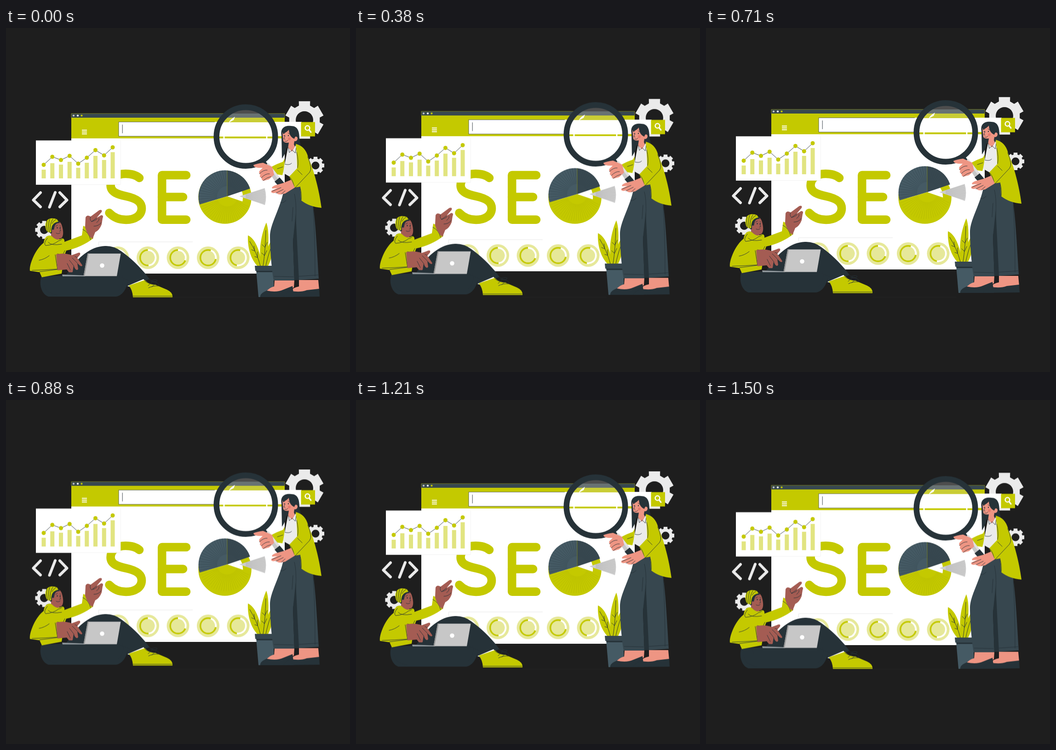
An HTML page that plays this animation: 748 px wide and 748 px high, repeating every 1540 ms.

```html
<!DOCTYPE html>
<html lang="en">
<head>
<meta charset="utf-8">
<title>SEO</title>
<style>
html, body { margin: 0; width: 100%; height: 100%; overflow: hidden; background: #1e1e1e; }
svg { display: block; width: 100vw; height: 100vh; }
.y { fill: #c4c900 }
.d { fill: #263238 }
.g { fill: #37474f }
.b { fill: #455a64 }
.w { fill: #fff }
.l { fill: #ebebeb }
.m { fill: #a45c53 }
.p { fill: #ee9583 }
.ln { fill: none; stroke: #263238; stroke-width: .9; stroke-linecap: round; stroke-linejoin: round }
.seo { fill: none; stroke: #c4c900; stroke-width: 18.5; stroke-linecap: round; stroke-linejoin: round }
.code { fill: none; stroke: #ebebeb; stroke-width: 6; stroke-linecap: round; stroke-linejoin: round }
</style>
</head>
<body>
<svg viewBox="0 0 748 748">
  <defs>
    <clipPath id="disc"><circle cx="476" cy="367" r="57.5"/></clipPath>
    <clipPath id="lens"><circle cx="521.5" cy="236" r="59"/></clipPath>
  </defs>

  <g class="float">
    <g id="gears" class="l" fill-rule="evenodd"></g>
    <path class="w" d="M142 186H606V534H142Z"/>
    <path class="y" d="M142 195H606V240H142Z"/>
    <path class="g" d="M142 186H606V195H142Z"/>
    <path d="M142 195V186H606V195" fill="none" stroke="#8f9420" stroke-width=".8"/>
    <circle cx="147" cy="190.5" r="2.1" fill="#c7c7c7"/>
    <circle class="w" cx="156" cy="190.5" r="2.1"/>
    <circle class="y" cx="164.5" cy="190.5" r="2.1"/>
    <path d="M165 222.300H176M165 226.300H176M165 230.300H176" stroke="#fff" stroke-width="1.900"/>
    <path class="w" d="M245 204H643V235.300H245Z"/>
    <path d="M454 235.300H245V204.300H454" fill="none" stroke="#263238" stroke-width=".7"/>
    <path class="ln" d="M253.200 210.500V228.500"/>
    <path class="y" d="M641.500 204.500H672V235.700H641.500Z"/>
    <circle cx="655.500" cy="217.500" r="4.900" fill="none" stroke="#fff" stroke-width="2.500"/>
    <path d="M659 221.500L663 226.500" stroke="#fff" stroke-width="3" stroke-linecap="round"/>
    <path d="M201.500 474V465H406" fill="none" stroke="#e2e2e2" stroke-width=".8"/>
    <g id="dials" fill="none"></g>
  </g>

  <path d="M362 585.500H545" stroke="#232323"/>
  <path class="seo" d="M290 326C283 320 273 317 260 317C240 317 227.500 328 227.500 342C227.500 357 243 362 262 366C285 371 295 379 295 392C295 408 280 417 261 417C245 417 233 411 224.500 402"/>
  <path class="seo" d="M392 320H339.200V416.700H392M339 367.500H385"/>
  <circle class="seo" cx="476" cy="368" r="48.500"/>

  <g class="float">
    <g clip-path="url(#disc)">
      <path class="b" d="M481 366V300H410V387Z"/>
      <path class="g" d="M481 366V300H540V346Z"/>
      <path class="y" d="M481 366L410 387V430H540V386Z"/>
      <path id="rays" fill="none" stroke-width=".6"/>
      <path id="sunrays" fill="none" stroke-width=".6"/>
      <path d="M481 366V300" stroke="#7d841c" stroke-width=".8"/>
    </g>
    <path d="M507.500 366L562.500 348Q568 366 563 385Z" fill="#cdcdcd"/>
    <path id="fan" fill="none" stroke-width=".6"/>

    <path class="w" d="M65 244.500H249V340.500H65Z"/>
    <path d="M249 244.500V340.500H65" fill="none" stroke="#efefef" stroke-width=".8"/>
    <g id="chart"></g>
    <path class="code" d="M75 358L59.500 374L75 389M107 357.500L94.500 389.500M117 358L132.500 374L117 389"/>

    <!-- plant -->
    <path class="y" d="M526 451C541 457 553 484 556 517H546C531 500 525 476 526 451Z"/>
    <path class="y" d="M566 423C574 444 571 489 563 517H556C548 488 554 451 566 423Z"/>
    <path class="y" d="M579 459C582 483 578 502 570 517H562C562 493 568 475 579 459Z"/>
    <path class="ln" d="M530 464Q546 490 553 517M565 440Q564 485 559 517M577 475Q568 500 565 517M534 482L541 485L539 474M541 497L547 499L547 487M557 471L563 477L568 466M556 489L562 495L567 484"/>
    <path class="b" d="M544 527H582V585H549Z"/>
    <path class="g" d="M541 517H582V528H542Z"/>
    <path class="d" d="M544 528H582V531H545Z"/>

    <!-- man -->
    <path class="m" d="M97 426C103 414 119 417 122 431C126 445 125 458 116 458L116 464L98 461L98 446Z"/>
    <path class="d" d="M96 446C91 437 97 420 107 418Q115 416 117 424Q109 423 106 430L104 439Q98 436 100 446Z"/>
    <path class="y" d="M86 434C83 416 97 410 111 416L114 421Q101 423 99 435L98 444Q88 447 86 434Z"/>
    <path class="ln" d="M89 420Q87 432 91 444M95 416Q90 430 95 445M102 415Q94 427 97 440M109 416Q102 420 100 425" stroke="#8b9000"/>
    <path class="ln" d="M108 431L112 429M117 430L119 431M117 435L119 441L116 442M109 446Q114 449 118 445"/>
    <circle class="d" cx="111.500" cy="434.500" r="1.300"/>
    <circle class="d" cx="118" cy="434.500" r="1.200"/>
    <path class="d" d="M77 540C71 556 77 579 92 584H239C252 583 262 568 265 552L263 563L312 546C298 526 272 500 250 485Q234 473 215 474C183 475 160 499 146 515L132 538Z"/>
    <path class="ln" d="M88 541Q102 539 104 551M82 556Q86 578 111 580M254 539Q259 558 244 572M247 541Q274 551 282 558" stroke="#455a64"/>
    <path class="y" d="M82 467C83 454 93 448 100 453Q111 465 122 457Q128 458 127 465L165 451L168 430Q185 437 190 457C174 470 151 480 131 484L127 495L121 534L78 542L73 531L52 528C50 516 63 481 82 467Z"/>
    <path class="ln" d="M90 457Q81 468 86 473Q103 472 114 463Q122 461 123 457M94 495Q84 503 72 505M128 484L123 494L112 491M107 493L112 525L73 530M167 438Q180 444 184 460M92 466Q98 474 121 470"/>
    <path d="M57 527Q85 526 113 524" class="ln"/>
    <path class="m" d="M109 492Q128 488 143 494L154 490Q163 486 161 493L155 500L166 516Q165 520 160 516L155 511L157 524Q154 529 150 523L147 517L145 530Q141 537 136 530L132 525L112 527Z"/>
    <path class="ln" d="M144 500L155 511M138 505L148 518M133 512L140 526M150 497L155 499" stroke="#5d332d"/>
    <path class="m" d="M172 433L173 412Q176 405 184 410L203 396Q210 394 208 400L197 413L207 407Q213 407 210 414L208 427Q203 440 194 444L188 459Q176 449 172 433Z"/>
    <path class="ln" d="M184 411Q181 416 186 421L197 413M186 421Q194 419 198 415M197 423Q204 418 202 414M191 431Q202 431 207 423" stroke="#4d2b28"/>
    <path d="M122 536L172 538V540H123Z" fill="#8d959a"/>
    <path class="d" d="M135 531L171 532L170 537L131 536Z"/>
    <path d="M177.500 490.500H249.500L241 539.500H168.500Z" fill="#c7c7c7"/>
    <path d="M177.500 490.500L168.500 539.500H171L180 490.500Z" fill="#999"/>
    <circle class="w" cx="209" cy="516.500" r="4.800"/>
    <path class="w" d="M264 561L299 546L304 552L276 565Z"/>
    <path class="y" d="M267 560L302 548Q310 557 324 558L350 569Q363 575 362 585.500H276Q275 569 267 560Z"/>
    <path class="ln" d="M275 583H361M302 550Q310 557 324 558M309 560L319 551M317 563L327 554M303 548Q306 539 315 549Q326 546 329 549Q326 555 314 551M317 550Q333 553 333 560M310 565Q320 560 331 561"/>

    <!-- woman -->
    <path class="d" d="M599 233C596 218 606 211 620 213C635 213 638 226 638 240L641 259L629 258L610 260Q608 273 600 284Z"/>
    <path class="p" d="M601 228Q607 222 614 221Q623 223 627 237Q634 234 634 241Q633 247 627 246L626 253L630 262L622 270L613 262L615 249Q607 251 603 246Z"/>
    <path class="d" d="M602 226Q609 212 623 217Q635 222 634 238Q629 233 627 241Q616 237 615 221Q612 226 602 230Z"/>
    <path class="ln" d="M602 230L606 229M613 228L617 231M607 234L604 241L607 242M606 246Q610 248 613 244"/>
    <circle class="d" cx="605" cy="234" r="1.100"/>
    <circle class="d" cx="614" cy="234" r="1.200"/>
    <circle cx="616" cy="241" r="3" fill="#e87a6d"/>
    <path class="g" d="M607 340L640 336L667 382C673 420 676 480 680 545L636 548L630 425L624 462L627 549H582C577 521 574 478 574 452C574 428 594 396 602 362Z"/>
    <path class="ln" d="M627 361Q633 382 629 431M609 375Q600 383 597 379M668 390Q672 455 672 540M583 540L625 541M636 540L679 537M624 390L622 420"/>
    <path class="d" d="M630 405L637 548H627L624 462Z"/>
    <path class="l" d="M613 260L622 269L630 255L645 264L644 306L622 326L602 315L607 291Z"/>
    <path class="ln" d="M614 260L616 271L622 265L629 272L631 260M606 296Q617 299 621 294"/>
    <path class="y" d="M575 303Q592 294 602 291L606 284Q606 301 601 320L581 317Z"/>
    <path class="y" d="M630 252C643 255 653 264 657 281C670 311 681 352 686 391Q660 389 642 375L640 345L627 347L616 323L633 305Q633 282 630 252Z"/>
    <path class="ln" d="M656 280Q667 306 660 314L628 348M617 324Q625 333 627 347M634 309L644 319M640 349Q643 360 642 374M632 270Q637 290 634 304M602 302L590 306"/>

    <!-- lens -->
    <g clip-path="url(#lens)">
      <path d="M460 176H584V186H460Z" fill="#4d4d4d"/>
      <path d="M460 186H584V195H460Z" fill="#687273"/>
      <path d="M460 195H584V205H460Z" fill="#c9cd35"/>
      <path d="M460 205H584V236H460ZM460 240H584V296H460Z" class="w"/>
      <path d="M474 235V241M567 235V241" stroke="#fff" stroke-width="3"/>
    </g>
    <path class="w" d="M484 206Q488 198 498 193L495 200Z"/>
    <circle cx="521.500" cy="236" r="63.800" fill="none" stroke="#263238" stroke-width="12.500"/>
    <path class="d" d="M556 293L563 288L570 297L563 302Z"/>
    <path d="M563 299L571 294L595 325L585 334Z" fill="#c7c7c7"/>
    <path d="M567 296L571 294L595 325L591 328Z" fill="#e0e0e0"/>
    <path class="d" d="M584 334L595 325L607 339L598 350Z"/>
    <path class="p" d="M579 302L559 293Q545 295 538 298Q538 303 549 304L558 304L551 311Q549 316 553 319Q550 324 556 326Q555 332 561 332L572 329L583 319Z"/>
    <path class="ln" d="M551 317Q560 308 568 309M555 326Q564 316 573 317M559 332Q567 325 576 323" stroke="#9c5148"/>
    <path class="p" d="M620 330L603 337L585 342Q576 346 579 349L590 348L577 354Q575 358 581 359L588 358Q589 362 597 362L607 360L628 347Z"/>
    <path class="ln" d="M579 355L598 347M587 359L603 351M599 361L607 354" stroke="#9c5148"/>

    <path class="p" d="M584 549H627L626 564L604 573L565 574Q573 564 583 562ZM637 548H679L681 570L653 574L614 574Q625 564 637 562Z"/>
    <path class="d" d="M553 585Q552 577 567 571Q588 576 603 569L623 561L626 585Z"/>
    <path class="d" d="M604 585Q604 577 617 571Q638 576 654 570L681 567L682 584Z"/>
    <path class="ln" d="M604 584Q605 577 618 573M553 583H603" stroke="#455a64"/>
  </g>
</svg>
<script>
const $ = id => document.getElementById(id);
const polar = (x, y, r, a) => [x + r * Math.cos(a), y + r * Math.sin(a)].map(v => v.toFixed(2)).join(' ');
const rad = deg => deg * Math.PI / 180;

function gear(x, y, r, teeth, hole) {
  const step = 2 * Math.PI / teeth, root = r * .79, pts = [];
  for (let i = 0; i < teeth; i++) {
    const a = i * step - Math.PI / 2;
    pts.push(polar(x, y, root, a - step * .35), polar(x, y, r, a - step * .28),
             polar(x, y, r, a + step * .28), polar(x, y, root, a + step * .35));
  }
  return `<path d="M${pts.join('L')}ZM${x - hole} ${y}a${hole} ${hole} 0 1 0 ${2 * hole} 0a${hole} ${hole} 0 1 0 ${-2 * hole} 0Z"/>`;
}
$('gears').innerHTML = gear(649, 200, 42.5, 6, 19) + gear(673, 299, 19.5, 8, 8.5) + gear(83, 439, 20, 8, 9);

const whiteArcs = [[-90, 90], [-90, 85], [-90, 20], [-70, 10], [-75, 100]];
$('dials').innerHTML = whiteArcs.map(([from, to], i) => {
  const x = 243 + i * 65.5, y = 499.5, r = 16.8;
  return `<circle cx="${x}" cy="${y}" r="24.500" fill="#e6e899"/>
    <circle cx="${x}" cy="${y}" r="${r}" stroke="#c4c900" stroke-width="3.500"/>
    <path d="M${polar(x, y, r, rad(from))}A${r} ${r} 0 0 1 ${polar(x, y, r, rad(to))}" stroke="#fff" stroke-width="4"/>`;
}).join('');

const dots = [297.5, 280, 287, 278, 295, 282, 265.5, 277, 259.5];
const tops = [308, 294, 297, 291, 304, 293, 278, 287, 270];
const dotX = i => 82 + i * 18.75;
$('chart').innerHTML =
  tops.map((y, i) => `<rect x="${dotX(i) - 4.5}" y="${y}" width="9" height="${327 - y}" fill="#e1e480"/>`).join('') +
  `<polyline class="ln" points="${dots.map((y, i) => dotX(i) + ',' + y)}"/>` +
  dots.map((y, i) => `<circle class="y" cx="${dotX(i)}" cy="${y}" r="4.500"/>`).join('');

function rays(id, color, x, y, from, to, n, r0, r1) {
  let d = '';
  for (let i = 0; i <= n; i++) {
    const a = rad(from + (to - from) * i / n);
    d += `M${polar(x, y, r0, a)}L${polar(x, y, r1, a)}`;
  }
  $(id).setAttribute('d', d);
  $(id).setAttribute('stroke', color);
}
rays('rays', '#35454d', 481, 366, 168, 338, 28, 22, 70);
rays('sunrays', '#b1b500', 481, 366, 26, 158, 24, 22, 70);
rays('fan', '#b2b2b2', 507.5, 366, -15, 15, 8, 14, 56);

// Straight rise and fall, held in 24 fps steps
const LOOP = 1540, STEPS = 37, RISE = 9.8;
const frames = Array.from({ length: STEPS + 1 }, (_, i) => {
  const p = i / STEPS;
  return {
    offset: i === STEPS ? 1 : Math.round(i * 100 / 24) * 10 / LOOP,
    transform: `translateY(${-RISE * (1 - Math.abs(1 - 2 * p))}px)`,
    easing: 'steps(1, end)'
  };
});
for (const el of document.querySelectorAll('.float'))
  el.animate(frames, { duration: LOOP, iterations: Infinity });
</script>
</body>
</html>
```
